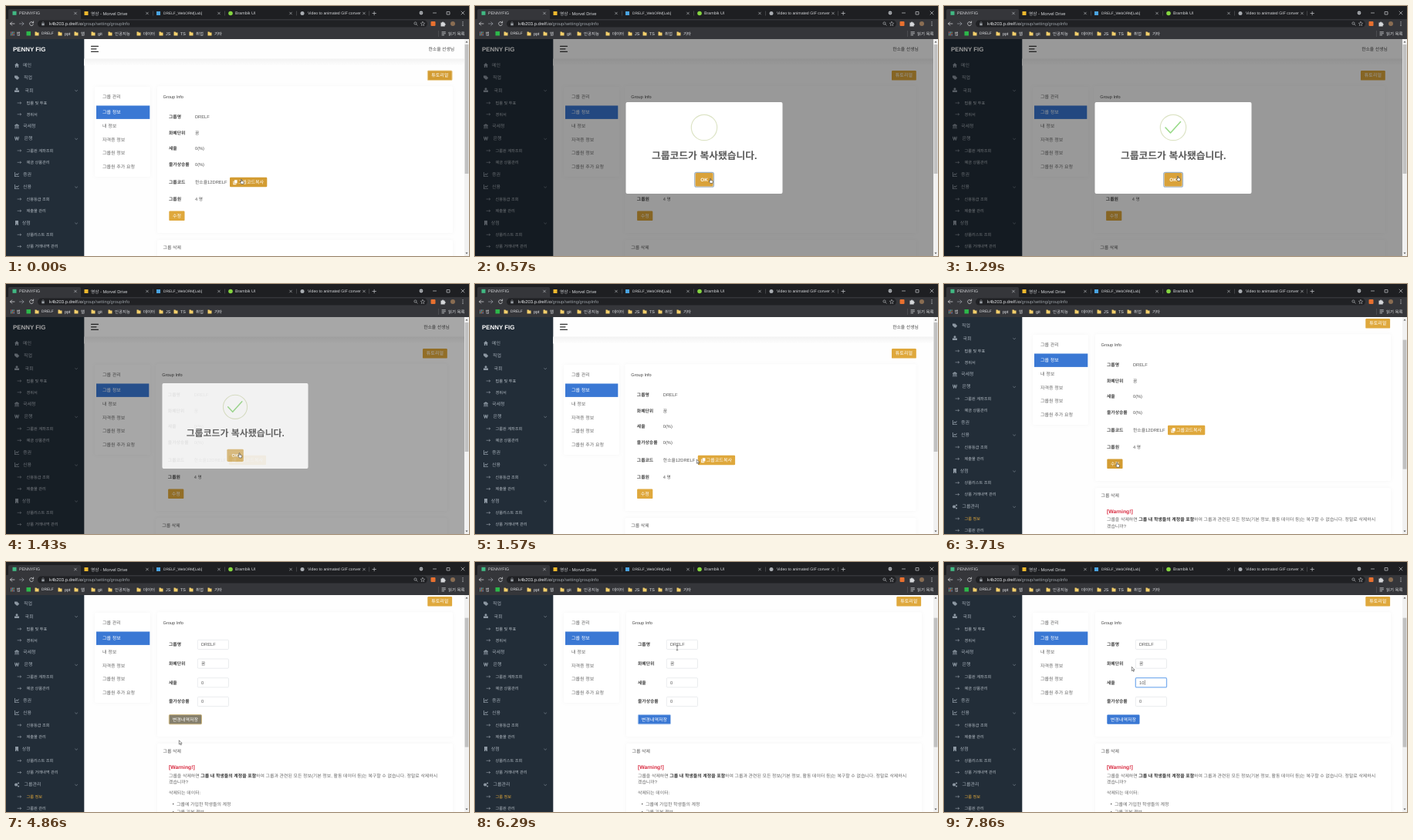
Animation of 600x325 px, one loop 8 s. Source, as an HTML page:

```html
<!DOCTYPE html>
<html lang="ko">
<head>
<meta charset="utf-8">
<title>Group settings</title>
<style>
html, body { margin: 0; width: 100%; height: 100%; overflow: hidden; background: #fff; }
svg { display: block; width: 600px; height: 325px; }
text { font-family: 'Liberation Sans', 'Noto Sans CJK KR', 'Noto Sans CJK', sans-serif; text-rendering: geometricPrecision; white-space: pre; }
.b { font-weight: bold; }
.card { fill: #fff; filter: drop-shadow(0 0 2.5px rgba(0, 0, 0, .035)); }
.line { fill: none; stroke-linecap: round; stroke-linejoin: round; }
</style>
</head>
<body>
<svg id="stage" viewBox="0 0 600 325" xmlns="http://www.w3.org/2000/svg"></svg>
<script>
const AMBER = '#dfa83c', BLUE = '#3a78d4', SIDE = '#8d98a3';

// y is the vertical centre of the line of text
const text = (x, y, s, size = 6, fill = '#666', extra = '') =>
  `<text x="${x}" y="${y + size * .36}" font-size="${size}" fill="${fill}" ${extra}>${s}</text>`;
const rect = (x, y, w, h, fill, extra = '') =>
  `<rect x="${x}" y="${y}" width="${w}" height="${h}" fill="${fill}" ${extra}/>`;
const dot = (x, y, r, fill, extra = '') => `<circle cx="${x}" cy="${y}" r="${r}" fill="${fill}" ${extra}/>`;
const line = (d, color, w = .7, extra = '') =>
  `<path class="line" d="${d}" stroke="${color}" stroke-width="${w}" ${extra}/>`;
const group = (id, body, extra = '') => `<g id="${id}" ${extra}>${body}</g>`;
const BOLD = 'class="b"', MID = 'text-anchor="middle"';

function browser() {
  const white = '#e4e6e9', grey = '#9aa0a6', ink = '#c6c9cd';
  const cross = x => line(`M${x - 1.4} 8.1l2.8 2.8m0-2.8l-2.8 2.8`, ink, .6);
  const folder = x => `<path d="M${x - 2.5} 33.6h2l.7.8h2.3v4h-5z" fill="#f3cf6b"/>`;
  const tabs = [
    [17, 'PENNYFIG', 5.3, 90], [110, '영상 - Morvel Drive', 5.7, 183],
    [204, 'DRELF_WebORM[Lab]', 4.8, 276], [297, 'Brambik UI', 5.3, 369],
    [391, 'Video to animated GIF conver', 5.2, 464]
  ];
  const marks = [
    [40, 'DRELF', 4.8], [70, 'ppt'], [91, '웹'], [113, 'git'], [135, '인공지능'],
    [172, '데이터'], [201, 'JS'], [220, 'TS'], [240, '취업'], [264, '기타']
  ];
  return rect(0, 0, 600, 18, '#1e1f22') + rect(0, 17, 600, 26, '#35363a') +
    '<path d="M1 18q2 0 2-3V6q0-2 2-2h90q2 0 2 2v9q0 3 2 3z" fill="#35363a"/>' +
    tabs.map(([x, s, size, end]) => text(x, 9.5, s, size, '#d5d7da') + cross(end)).join('') +
    [190, 283, 376, 470].map(x => rect(x, 6.5, .6, 6, '#5a5c60')).join('') +
    rect(8.5, 6.8, 5, 5, '#41b883') + rect(101.5, 7, 5, 5, '#eeb82d') + rect(195, 7, 5, 5, '#4aa3e0') +
    dot(291, 9.5, 2.8, '#85d540') + dot(384, 9.5, 2.5, '#a9adb2') +
    line('M475 9.5h4.4m-2.2-2.2v4.4', ink) +
    dot(538, 9, 2.4, '#aeb2b7') + line('M537 8.5l1 1 1-1', '#222', .6) +
    line('M553.5 9h4M571.5 7.5h3.5v3.5h-3.5zM590 7l4 4m0-4l-4 4', white, .6) +
    line('M11 23H5.5m2.2-2.2L5.5 23l2.2 2.2', white) +
    line('M17.5 23H23m-2.2-2.2L23 23l-2.2 2.2', grey) +
    line('M35.2 21.6a2.5 2.5 0 1 0 .3 2.2M35.6 20v1.9h-1.9', white) +
    rect(41, 18.6, 505, 9, '#202124', 'rx="4.5"') +
    rect(46.3, 22.5, 3.4, 2.8, grey) + line('M47 22.4v-.8a1 1 0 0 1 2 0v.8', grey, .5) +
    text(56, 23, `k4b203.p.drelf.io<tspan fill="${grey}">/group/setting/groupInfo</tspan>`, 5.8, white) +
    dot(530.5, 22.5, 1.6, 'none', `stroke="${ink}" stroke-width=".6"`) + line('M531.7 23.7l1.5 1.5', ink, .6) +
    line('M540 20.4l.8 1.7 1.9.2-1.4 1.3.4 1.9-1.7-.9-1.7.9.4-1.9-1.4-1.3 1.9-.2z', ink, .5) +
    rect(550.5, 20, 6, 6, '#e8702f', 'rx="1"') +
    '<path d="M563.5 21.5h1.6a1 1 0 0 1 2 0h1.6v1.4a1 1 0 0 1 0 2v1.5h-5.2z" fill="#d5d7da"/>' +
    dot(579, 23, 3, '#8a6d52') + [20.8, 23, 25.2].map(y => dot(592, y, .6, white)).join('') +
    [0, 1, 2].map(i => [0, 1, 2].map(j => rect(6 + i * 1.8, 33.5 + j * 1.8, 1.2, 1.2,
      ['#e2685c', '#6fa8e8', '#7cc48a'][(i + j) % 3])).join('')).join('') +
    text(13.5, 35.7, '앱', 5.5, white) + rect(26.5, 33, 5.5, 5.5, '#2db74a') +
    marks.map(([x, s, size = 5.4]) => folder(x) + text(x + 6, 35.7, s, size, white)).join('') +
    rect(560, 32, .6, 8, '#5a5c60') +
    line('M565 33.8h4.4M565 35.8h4.4M565 37.8h2.6', white, .7) + text(573, 35.7, '읽기 목록', 5.4, white);
}

function sidebar() {
  // Each icon: x of the label beside it, outline
  const icon = {
    home: [22, 'M0 3l3-3 3 3h-.9v3H3.6V4H2.4v2H.9V3z'],
    tags: [23, 'M0 .6h2.6l2.8 2.8-2.4 2.4L0 3zM3.6.6l2.6 2.8-2.3 2.5-.5-.5 2-2L2.8.6z'],
    people: [24.5, 'M1.5 1.2a1.5 1.5 0 1 1 3 0 1.5 1.5 0 0 1-3 0M0 3h6v2.6H0z'],
    bank: [22, 'M0 1.8L3 0l3 1.8v.6H0zM.7 2.8h1v2h-1zM2.5 2.8h1v2h-1zM4.3 2.8h1v2h-1zM0 5.2h6V6H0z'],
    won: [23.5, 'M0 .5h1l.6 3.4L2.5.5h1l.9 3.4L5 .5h1l-1.2 5h-.9L3 2.6l-.9 2.9h-.9zM0 2.4h6v.6H0z'],
    chart: [22, 'M0 0h.8v5.2H6V6H0zM1.4 3.2l1.3-1.5 1.2 1L5.6.7v1.4L4 4 2.8 2.9 1.4 4.6z'],
    shop: [20.8, 'M1 0h4v6H3.6V4.6H2.4V6H1z'],
    gears: [23.5, 'M0 3.2a2.1 2.1 0 1 1 4.2 0 2.1 2.1 0 0 1-4.2 0M4 1.2a1.1 1.1 0 1 1 2.2 0 1.1 1.1 0 0 1-2.2 0M4 5.2a1.1 1.1 0 1 1 2.2 0 1.1 1.1 0 0 1-2.2 0']
  };
  const items = [
    [77, '메인', 'home'], [93, '직업', 'tags'], [109.5, '국회', 'people', 1],
    [126, '법률 및 투표'], [140.8, '경위서'], [156.3, '국세청', 'bank'], [172.3, '은행', 'won', 1],
    [188, '그룹원 계좌조회'], [203.3, '예금 상품관리'], [219, '증권', 'chart'], [235, '신용', 'chart', 1],
    [251, '신용등급 조회'], [266.3, '제출물 관리'], [282, '상점', 'shop', 1],
    [297.3, '상품리스트 조회'], [312.6, '상품 거래내역 관리'], [328.3, '그룹관리', 'gears', 1],
    [344, '그룹 정보'], [359.3, '그룹원 관리']
  ];
  return text(9, 56.5, 'PENNY FIG', 7.9, '#fff', BOLD) + items.map(([y, s, name, open]) => {
    if (!name) return line(`M15 ${y}h4.6m-1.3-1.2l1.3 1.2-1.3 1.2`, '#aab3bc', .5) +
      text(26.5, y, s, 5.2, s === '그룹 정보' ? '#e3a93c' : '#b4bcc4');
    const [x, d] = icon[name];
    return `<path d="${d}" transform="translate(11 ${y - 3})" fill="${SIDE}"/>` +
      text(x, y, s, 6, '#a3adb7') +
      (open ? line(`M89.6 ${y}l1.5 1.4 1.5-1.4`, SIDE, .6) : '');
  }).join('');
}

function button(id, x, y, w, h, s, tx) {
  return rect(x, y, w, h, AMBER, `rx="1.2" id="${id}"`) +
    text(tx || x + w / 2, y + h / 2 - .2, s, 6, '#fff', tx ? '' : MID);
}

function page() {
  const label = (y, s) => text(211, y, s, 5.8, '#444', BOLD);
  const names = ['그룹명', '화폐단위', '세율', '물가상승률'];
  const menu = ['내 정보', '자격증 정보', '그룹원 정보', '그룹원 추가 요청'];
  const info = [[144.2, 'DRELF'], [164.8, '꿈'], [185.4, '0(%)'], [206, '0(%)']];

  const view = info.map(([y, v], i) => label(y, names[i]) + text(245, y, v, 5.7, '#555')).join('') +
    label(228.8, '그룹코드') + text(245, 228.8, '한소율12DRELF', 5.8, '#555') +
    button('copy', 290, 222.8, 48.3, 12.4, '그룹코드복사', 301) +
    '<path d="M296 226.2h3.6v4.4H296zM294.4 227.6h1v3.7h3v1h-4z" fill="#fff"/>' +
    label(251.3, '그룹원') + text(245, 251.3, '4 명', 5.7, '#555') +
    button('edit', 211.3, 266.5, 20.2, 12.6, '수정');

  const form = names.map((s, i) => {
    const y = 146.3 + i * 24.7;
    return label(y, s) +
      rect(248.3, y - 6, 40.2, 12.2, '#fff', `rx="1.2" stroke="#dcdfe3" stroke-width=".6" id="box${i}"`) +
      (i === 2 ? rect(252.6, y - 3.5, 3.6, 7, '#2f7bd8', 'id="selection"') : '') +
      text(253, y, ['DRELF', '꿈', '0', '0'][i], 5.7, '#555', `id="value${i}"`);
  }).join('') +
    rect(259.9, 192.4, .5, 6.6, '#333', 'id="caret"') +
    button('save', 211.3, 237.6, 42.2, 12.2, '변경내역저장');

  const warn = 211;
  const drop = text(203.5, 314, '그룹 삭제', 5.9, '#555') +
    text(warn, 334.2, '[Warning!]', 6.8, '#d8293f', BOLD) +
    text(warn, 345.2, '그룹을 삭제하면 <tspan class="b" fill="#333">그룹 내 학생들의 계정을 포함</tspan>하여 그룹과 관련된 모든 정보(기본 정보, 활동 데이터 등)는 복구할 수 없습니다. 정말로 삭제하시', 5.92) +
    text(warn, 353.8, '겠습니까?', 5.9) + text(warn, 368, '삭제되는 데이터:', 5.9) +
    [[382.3, '그룹에 가입한 학생들의 계정'], [392.6, '그룹 기본 정보']]
      .map(([y, s]) => dot(216.7, y, .8, '#555') + text(221, y, s, 5.95)).join('');

  return rect(101, 68.5, 493, 9, 'url(#shade)') +
    line('M110.5 52.3h9M110.5 55.8h6.5M110.5 59.3h9', '#333', 1.2) +
    group('right', text(547.5, 55.5, '한소율 선생님', 5.8, '#444') + button('guide', 546.3, 84, 31.8, 12.6, '튜토리얼')) +
    '<rect class="card" x="115" y="105" width="72" height="117" rx="2"/>' +
    text(125, 117.6, '그룹 관리', 6) +
    rect(117, 129.5, 69.3, 17.4, BLUE, 'id="current"') + text(125, 138.3, '그룹 정보', 6, '#fff') +
    menu.map((s, i) => text(125, 155.9 + i * 17.5, s, 6)).join('') +
    '<rect id="infoCard" class="card" y="104.3" rx="2"/><rect id="dropCard" class="card" height="150" rx="2"/>' +
    group('inner', text(203.5, 117.6, 'Group Info', 5.6, '#444') +
      group('view', view) + group('form', form) + group('drop', drop));
}

const popup = rect(195.5, 125, 203, 119, '#fff', 'rx="2"') +
  dot(297, 158, 16.7, 'none', 'stroke="#dde4c6" stroke-width="1.2"') +
  line('M287 158l6.5 7 13-14.5', '#98da88', 1.6, 'id="check" pathLength="100" stroke-dasharray="100 200"') +
  text(297.3, 194, '그룹코드가 복사됐습니다.', 12.8, '#595959', BOLD + ' ' + MID) +
  rect(284.8, 216.3, 24.6, 18.8, 'none', 'rx="2.2" stroke="#9db0c2" stroke-width="1.3" id="okRing"') +
  rect(285.6, 217, 23, 17.4, '#d9a23a', 'rx="1.6" id="ok"') + text(297, 225.6, 'OK', 6.3, '#fff', BOLD + ' ' + MID);

const outline = 'stroke="#111" stroke-width=".6" stroke-linejoin="round" fill="#fff"';
const pointers = {
  arrow: `<path d="M0 0v6.6l1.6-1.4 1.1 2.5 1.1-.5-1.1-2.4h2z" ${outline}/>`,
  hand: `<path d="M-.7.6q.7-1 1.4 0v2.6l2.6.6q.9.3.8 1.2L3.6 8H-.2L-2.3 5q.2-1 1.6-.1z" ${outline}/>`,
  beam: line('M-1.2 0h2.4M0 0v7M-1.2 7h2.4', '#222', .6)
};

stage.innerHTML =
  '<defs><linearGradient id="shade" x2="0" y2="1"><stop stop-color="#f2f2f2"/><stop offset="1" stop-color="#fefefe"/></linearGradient></defs>' +
  rect(0, 0, 600, 325, '#fefefe') + rect(0, 43, 101.3, 282, '#222d38') +
  group('content', sidebar() + page()) + rect(594, 43, 6, 282, '#f1f1f1') +
  rect(594.6, 50, 4.8, 168, '#c1c1c1', 'id="thumb"') +
  '<path d="M595.5 47.5l1.5-2 1.5 2zM595.5 320.5l1.5 2 1.5-2z" fill="#555"/>' +
  rect(0, 43, 594, 282, '#000', 'id="shadeAll"') + group('popup', popup) +
  browser() + group('pointer', Object.entries(pointers).map(([id, s]) => group(id, s)).join(''));

const $ = id => document.getElementById(id);
const set = (id, attrs) => { for (const a in attrs) $(id).setAttribute(a, attrs[a]); };
const show = (id, on) => set(id, { visibility: on ? 'visible' : 'hidden' });
const move = (id, x, y, scale = 1) => set(id, { transform: `translate(${x} ${y}) scale(${scale})` });
const clamp = v => Math.min(1, Math.max(0, v));

// Linear interpolation through [position, value] points
function track(points, p, col = 1) {
  const i = points.findIndex(q => q[0] > p);
  if (i < 0) return points[points.length - 1][col];
  if (!i) return points[0][col];
  const a = points[i - 1], b = points[i];
  return a[col] + (b[col] - a[col]) * (p - a[0]) / (b[0] - a[0]);
}

const RATE = 7 / 1000, LOOP = 8000;
const POP = [[0, .7], [.45, 1.05], [.8, .95], [1, 1]];
const SCROLL = [[16, 0], [17, 26], [18, 39]];
const PATH = [
  [0, 305, 225], [1, 305, 225], [4, 305, 224], [9, 303, 221], [10, 302.5, 219.5], [11, 287.3, 228],
  [14, 256, 250], [16, 256, 250], [18, 260, 242.5], [24, 224.3, 231.8], [34, 224.3, 231.8], [39, 238, 203],
  [41, 252, 170], [44, 262, 109], [47, 258, 153], [48, 243.3, 136.3]
];

function render(step) {
  const t = step / RATE;

  const open = step >= 2 && step <= 10, since = t - 200, hide = clamp((t - 1408) / 150);
  const scale = track(POP, since / 300) * (1 - hide / 2);
  show('popup', open);
  set('popup', { opacity: 1 - hide, transform: `translate(297 184.5) scale(${scale}) translate(-297 -184.5)` });
  set('shadeAll', { opacity: open ? .4 * clamp(since / 100) * (1 - hide) : 0 });
  const drawn = clamp((since - 405) / 330);
  show('check', open && drawn > 0);
  set('check', { 'stroke-dashoffset': 100 - 100 * drawn });
  show('okRing', open && !hide);
  set('ok', { fill: hide ? '#dfbd78' : '#d9a23a' });

  // The dialog pads the page on the right while it is up
  const pad = step >= 2 && step <= 11 ? 1 : 0, editing = step >= 34;
  const left = { x: 196 - 1.5 * pad, width: 383 - 6 * pad };
  set('infoCard', { ...left, height: editing ? 161.5 : 190.7 });
  set('dropCard', { ...left, y: editing ? 275 : 304.2 });
  set('current', { width: 69.3 - pad });
  move('right', -6.3 * pad, 0);
  move('inner', -1.2 * pad, 0);
  move('drop', 0, editing ? -28.7 : 0);
  show('view', !editing);
  set('form', { display: editing ? 'inline' : 'none' });

  const scroll = track(SCROLL, step);
  move('content', 0, -scroll);
  move('thumb', 0, scroll * .58);

  const pressed = step < 2;
  set('guide', { fill: pressed ? '#d39c32' : AMBER, stroke: pressed ? '#ecd29a' : 'none' });
  set('copy', { fill: pressed ? '#d39c32' : AMBER });
  set('edit', { fill: step >= 23 ? '#d39c32' : AMBER });
  set('save', {
    fill: step === 34 ? '#857f6c' : BLUE,
    stroke: step === 34 ? '#cdb67c' : step < 48 ? '#a9c6ee' : 'none'
  });

  const focus = step >= 48, typed = step >= 55;
  set('box2', { stroke: focus ? '#7db0ef' : '#dcdfe3', 'stroke-width': focus ? 1.3 : .6 });
  show('selection', editing && focus && step < 53);
  set('value2', { fill: focus && step < 53 ? '#fff' : '#555' });
  $('value2').textContent = typed ? '10' : step >= 53 ? '' : '0';
  show('caret', editing && step >= 53);
  move('caret', typed ? 0 : -6.7, 0);

  const hand = step < 11 || step >= 23 && step < 34 || step >= 39 && step < 41;
  const kind = hand ? 'hand' : step >= 41 && step < 48 ? 'beam' : 'arrow';
  for (const id in pointers) show(id, id === kind);
  move('pointer', track(PATH, step), track(PATH, step, 2), .8);
}

function tick() {
  const t = performance.now() % LOOP;
  render(Math.floor((t + 5) * RATE) % (LOOP * RATE));
  requestAnimationFrame(tick);
}
tick();
</script>
</body>
</html>
```
